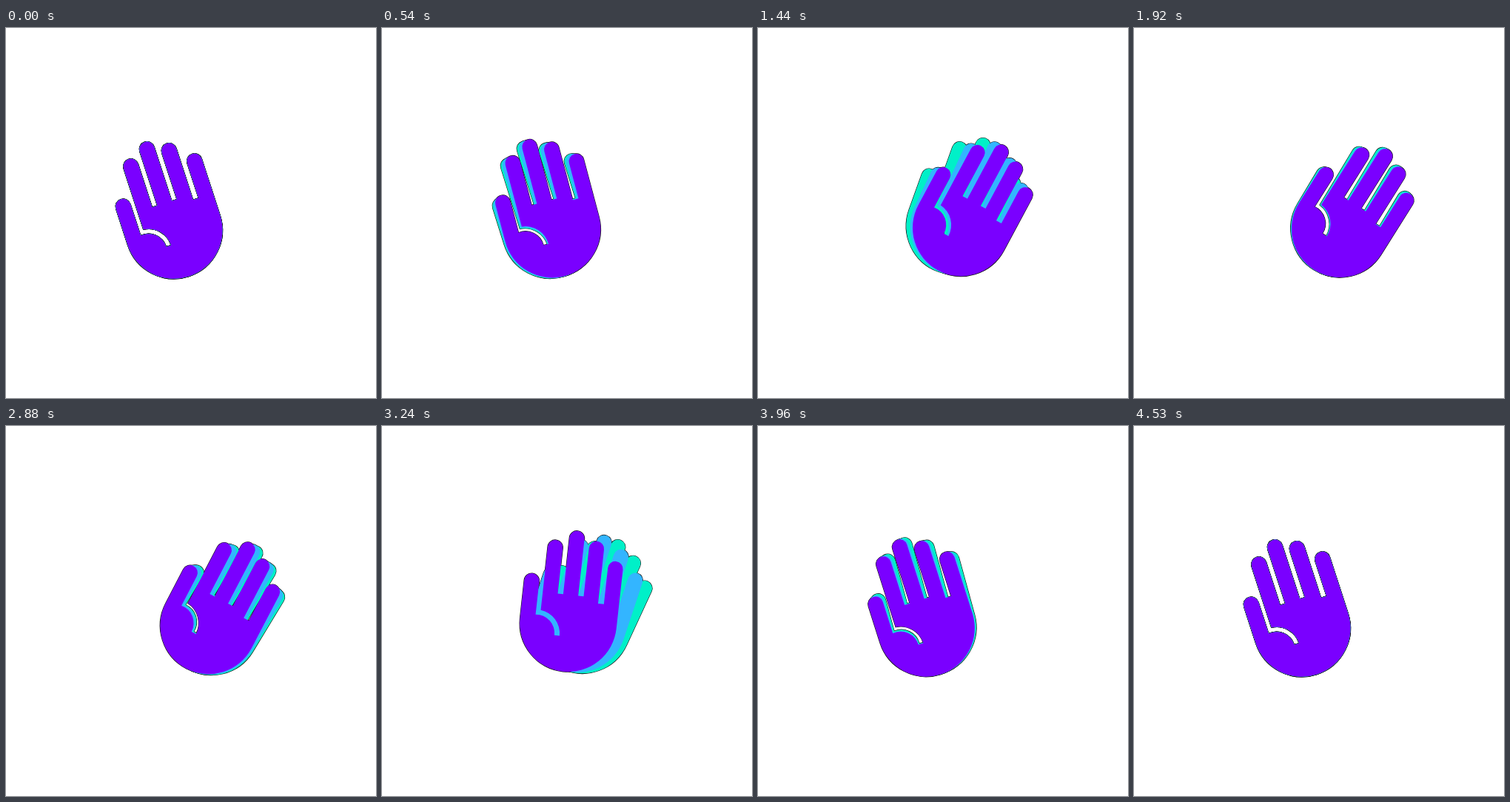
An HTML page that plays this animation: 500 px wide and 500 px high, repeating every 4.74 s.

```html
<!DOCTYPE html>
<html lang="en">
<head>
<meta charset="utf-8">
<title>Waving hand</title>
<style>
  html, body { margin: 0; width: 100%; height: 100%; overflow: hidden; background: #fff; }
  svg { display: block; width: 100%; height: 100%; }
</style>
</head>
<body>
<svg viewBox="0 0 500 500">
  <defs>
    <!-- Upright hand, origin at the wrist pivot -->
    <path id="hand" d="M-75.2-111.7a10.2 10.2 0 0 1 20.4 0V-67A25 25 0 0 1-26.5-42h7
      A32 32 0 0 0-48.5-73.8V-160a10.2 10.2 0 0 1 20.4 0V-98.5h7.4
      V-175.4a10.2 10.2 0 0 1 20.4 0V-98.5h7.4V-164.3a10.2 10.2 0 0 1 20.4 0V-91h7.9
      V-140.2a10.2 10.2 0 0 1 20.4 0V-60A65.5 65.5 0 0 1-75.2-60Z"/>
  </defs>
  <g id="stage" transform="translate(254.7 327.4)"></g>
</svg>
<script>
const LOOP = 4740;
const REST = -18, SWING = 50.3;
const OUT = { start: 5, length: 2030 };
const BACK = { start: 2312, length: 1840 };
const LAYERS = [
  { color: '#00f0c8', lag: 262 },
  { color: '#33b5ff', lag: 131 },
  { color: '#7a00ff', lag: 0 }
];

const stage = document.getElementById('stage');

function addHand(attributes) {
  const use = document.createElementNS('http://www.w3.org/2000/svg', 'use');
  use.setAttribute('href', '#hand');
  for (const name in attributes) use.setAttribute(name, attributes[name]);
  return stage.appendChild(use);
}

// The thin dark rims lie below all fills, so only the common silhouette shows them.
const rims = LAYERS.map(() => addHand({ fill: 'none', stroke: '#111', 'stroke-width': 1.2 }));
const fills = LAYERS.map(({ color }) => addHand({ fill: color }));

// cubic-bezier(.75, 0, .25, 1)
function ease(x) {
  if (x <= 0) return 0;
  if (x >= 1) return 1;
  let low = 0, high = 1, s;
  for (let i = 0; i < 24; i++) {
    s = (low + high) / 2;
    const r = 1 - s;
    if (2.25 * s * r * r + 0.75 * s * s * r + s ** 3 < x) low = s; else high = s;
  }
  return s * s * (3 - 2 * s);
}

const progress = (move, time) => ease((time - move.start) / move.length);

function draw(now) {
  const time = now % LOOP;
  LAYERS.forEach(({ lag }, i) => {
    const t = time - lag;
    const angle = REST + SWING * (progress(OUT, t) - progress(BACK, t));
    for (const hand of [rims[i], fills[i]]) hand.setAttribute('transform', `rotate(${angle})`);
  });
}

let began;
function tick(now) {
  began ??= now;
  draw(now - began);
  requestAnimationFrame(tick);
}
draw(0);
requestAnimationFrame(tick);
</script>
</body>
</html>
```
